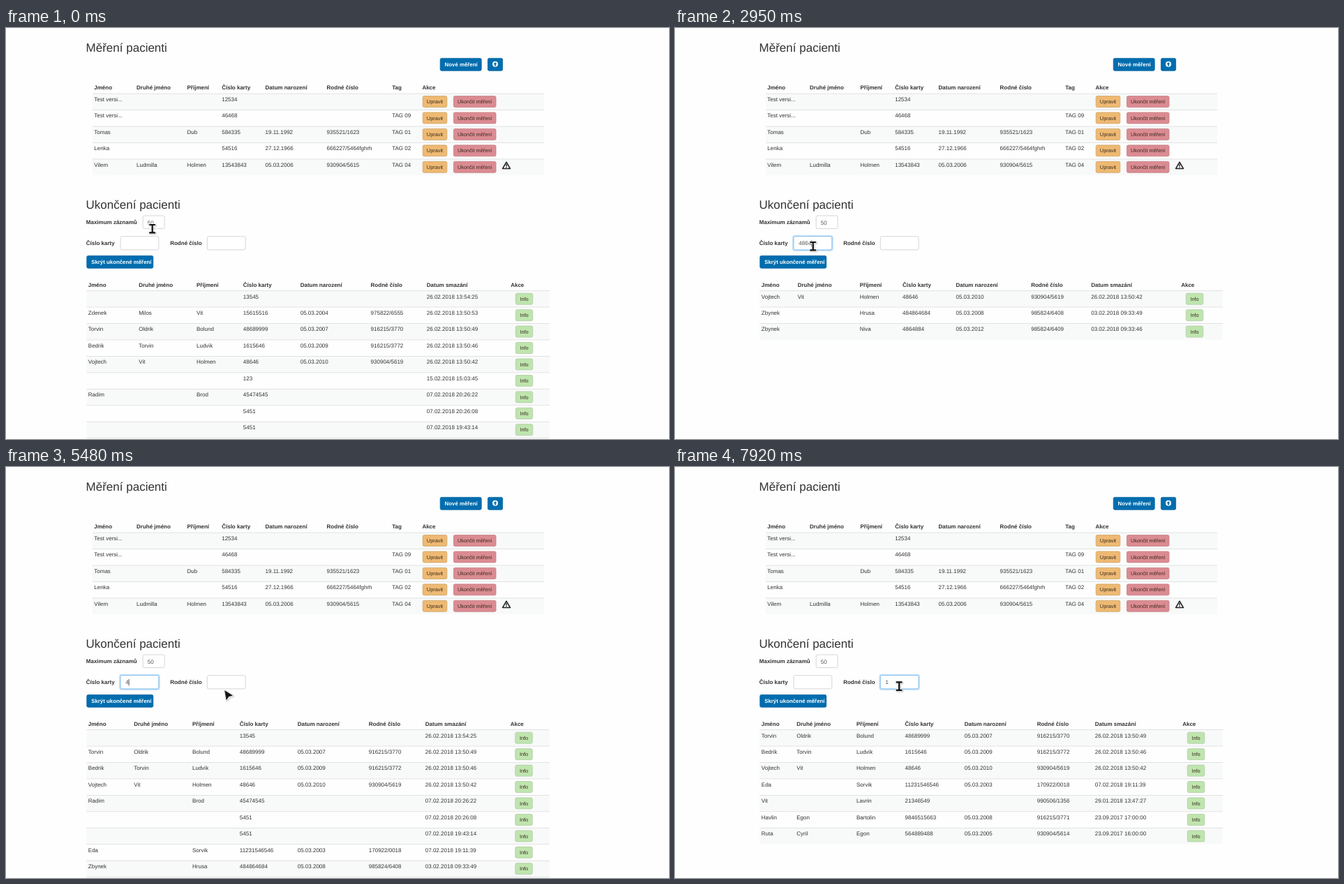
An HTML page for the animation above (8 s loop, 950 by 589 pixels).

```html
<!DOCTYPE html>
<html lang="cs">
<head>
<meta charset="utf-8">
<title>Pacienti</title>
<style>
html, body { margin: 0; width: 100%; height: 100%; overflow: hidden; background: #fefefe; }
svg { display: block; width: 950px; height: 589px; }
text { font: 8px "Liberation Sans", Arial, sans-serif; fill: #333; text-rendering: geometricPrecision; white-space: pre; }
.b { font-weight: bold; }
.h { font-size: 17px; }
.w { font-weight: bold; fill: #fff; font-size: 7.85px; }
.s { font-size: 7.35px; fill: #3a2c20; text-anchor: middle; }
.i { font-size: 8.1px; fill: #555; }
</style>
</head>
<body>
<svg id="stage" viewBox="0 0 950 589" xmlns="http://www.w3.org/2000/svg"></svg>
<script>
const LOOP = 8000, PITCH = 23.45, DIGIT = 4.5;
const stage = document.getElementById('stage');

function el(parent, tag, attrs, content) {
  const n = document.createElementNS('http://www.w3.org/2000/svg', tag);
  for (const k in attrs) n.setAttribute(k, attrs[k]);
  if (content !== undefined) n.textContent = content;
  return parent.appendChild(n);
}
const text = (p, x, y, s, cls = '') => el(p, 'text', { x, y, class: cls }, s);
const rect = (p, x, y, width, height, fill, more) => el(p, 'rect', { x, y, width, height, fill, ...more });
const rule = (p, x, y, w) => rect(p, x, y, w, 0.8, '#dcdcdc');
const box = (p, x, y, w, h, fill, stroke) =>
  rect(p, x + 0.4, y + 0.4, w - 0.8, h - 0.8, fill, { rx: 2, stroke, 'stroke-width': 0.8 });

function smallButton(p, x, cy, w, label, fill, stroke) {
  box(p, x, cy - 8.4, w, 16.8, fill, stroke);
  text(p, x + w / 2, cy + 2.6, label, 's');
}
function blueButton(p, x, y, w, label) {
  box(p, x, y, w, 18.6, '#006dae', '#0064a2');
  if (label) text(p, x + 6.8, y + 11.7, label, 'w');
}

const page = el(stage, 'g', {});

// Measured patients
text(page, 114.6, 34, 'Měření pacienti', 'h');
blueButton(page, 621.8, 43, 59.8, 'Nové měření');
blueButton(page, 690, 43, 22);
el(page, 'circle', { cx: 701, cy: 51.8, r: 4, fill: '#fff' });
el(page, 'path', { d: 'M701 48.9 L703.5 51.7 H701.9 V54.5 H700.1 V51.7 H698.5 Z', fill: '#006dae' });

const topX = [126.3, 187, 259.5, 309.2, 371.6, 459.6, 553.2, 596.4];
const topHead = ['Jméno', 'Druhé jméno', 'Příjmení', 'Číslo karty', 'Datum narození', 'Rodné číslo', 'Tag', 'Akce'];
const topRows = [
  'Test versi...|||12534',
  'Test versi...|||46468|||TAG 09',
  'Tomas||Dub|584335|19.11.1992|935521/1623|TAG 01',
  'Lenka|||54516|27.12.1966|666227/5464fghrh|TAG 02',
  'Vilem|Ludmilla|Holmen|13543843|05.03.2006|930904/5615|TAG 04'
];
topHead.forEach((s, i) => text(page, topX[i], 88, s, 'b'));
topRows.forEach((row, r) => {
  const y = 93.7 + r * PITCH;
  if (r % 2 === 0) rect(page, 124, y, 647, PITCH, '#f8f9f9');
  rule(page, 124, y, 647);
  row.split('|').forEach((s, i) => text(page, topX[i], y + 11.2, s));
  smallButton(page, 596.8, y + 11.8, 35.4, 'Upravit', '#eeb972', '#cfa568');
  smallButton(page, 641, y + 11.8, 61.4, 'Ukončit měření', '#db8b92', '#c67f86');
});
el(page, 'path', {
  d: 'M717 192.2 L722.4 201.5 H711.6 Z', fill: 'none', stroke: '#222',
  'stroke-width': 1.5, 'stroke-linejoin': 'round'
});
rect(page, 716.3, 195, 1.4, 3.4, '#222');
rect(page, 716.3, 199, 1.4, 1.2, '#222');

// Finished patients: form
text(page, 114.6, 259.4, 'Ukončení pacienti', 'h');
text(page, 114.8, 281.4, 'Maximum záznamů', 'b');
box(page, 195.8, 268.6, 31.8, 19.4, '#fff', '#ccc');
text(page, 202.8, 281.6, '50', 'i');
text(page, 114.8, 311.4, 'Číslo karty', 'b');
text(page, 235.2, 311.4, 'Rodné číslo', 'b');

function field(x) {
  const glow = rect(page, x - 0.7, 297.6, 57, 21.4, 'none',
    { rx: 3, stroke: '#66afe9', 'stroke-width': 1.8, opacity: 0.35 });
  const frame = box(page, x, 298.3, 55.6, 20, '#fff', '#ccc');
  const value = text(page, x + 7.6, 311.4, '', 'i');
  const caret = rect(page, 0, 304, 0.8, 9.4, '#333');
  return (s, focus, blink) => {
    glow.style.display = focus ? '' : 'none';
    frame.setAttribute('stroke', focus ? '#66afe9' : '#ccc');
    value.textContent = s;
    caret.style.display = focus && blink ? '' : 'none';
    caret.setAttribute('x', x + 7.6 + s.length * DIGIT);
  };
}
const cardField = field(163.6), birthField = field(287.9);
blueButton(page, 115.4, 326, 95.8, 'Skrýt ukončené měření');

// Finished patients: list
const head = ['Jméno', 'Druhé jméno', 'Příjmení', 'Číslo karty', 'Datum narození', 'Rodné číslo', 'Datum smazání', 'Akce'];
const rows = [
  '|||13545|||26.02.2018 13:54:25',
  'Zdenek|Milos|Vit|15615516|05.03.2004|975822/6555|26.02.2018 13:50:53',
  'Torvin|Oldrik|Bolund|48689999|05.03.2007|916215/3770|26.02.2018 13:50:49',
  'Bedrik|Torvin|Ludvik|1615646|05.03.2009|916215/3772|26.02.2018 13:50:46',
  'Vojtech|Vit|Holmen|48646|05.03.2010|930904/5619|26.02.2018 13:50:42',
  '|||123|||15.02.2018 15:03:45',
  'Radim||Brod|45474545|||07.02.2018 20:26:22',
  '|||5451|||07.02.2018 20:26:08',
  '|||5451|||07.02.2018 19:43:14',
  'Eda||Sorvik|11231546546|05.03.2003|170922/0018|07.02.2018 19:11:39',
  'Zbynek||Hrusa|484864684|05.03.2008|985824/6408|03.02.2018 09:33:49',
  'Zbynek||Niva|4864884|05.03.2012|985824/6409|03.02.2018 09:33:46',
  'Vit||Lavrin|21346549||990506/1356|29.01.2018 13:47:27',
  '|||15487|||24.01.2018 10:12:05',
  'Havlin|Egon|Bartolin|9846515663|05.03.2008|916215/3771|23.09.2017 17:00:00',
  'Ruta|Cyril|Egon|564889488|05.03.2005|930904/5614|23.09.2017 16:00:00'
].map(s => s.split('|'));

const layouts = {
  all: [117.8, 190.2, 273, 339.8, 421.7, 522.6, 602.8, 723.2],
  one: [117.8, 183.2, 267, 334.8, 417.7, 519.8, 600.8, 722.7],
  few: [117.8, 169.7, 258.7, 320, 396.5, 504.2, 590.2, 719.2],
  birth: [117.8, 168.2, 254, 323.6, 408.7, 512.7, 595.7, 721.2],
  none: [117.8, 173.9, 269.8, 335.5, 417.7, 533.6, 623.5, 737.4]
};

const lists = {};
function list(card, birth) {
  const key = card + '/' + birth;
  if (lists[key]) return lists[key];
  const found = rows.filter(r => r[3].includes(card) && (r[5] || '').includes(birth));
  const kind = !found.length ? 'none' : birth ? 'birth' : card.length > 1 ? 'few' : card ? 'one' : 'all';
  const x = layouts[kind], g = el(page, 'g', {});
  head.forEach((s, i) => text(g, x[i], 371, s, 'b'));
  found.slice(0, 10).forEach((row, r) => {
    const y = 376.2 + r * PITCH;
    if (r % 2 === 0) rect(g, 115.4, y, 663.6, PITCH, '#f8f9f9');
    rule(g, 115.4, y, 663.6);
    row.forEach((s, i) => text(g, x[i], y + 11.3, s));
    smallButton(g, x[7] + 6.7, y + 12, 25.2, 'Info', '#bfe5ae', '#b0cba6');
  });
  if (!found.length) rule(g, 115.4, 376.2, 663.6);
  return lists[key] = { g, shift: found.length > 8 ? 0 : 6 };
}

// Pointer
function pointer(d, more) {
  const g = el(stage, 'g', {});
  const base = { d, 'stroke-linejoin': 'round', 'stroke-linecap': 'round' };
  el(g, 'path', { ...base, ...more, stroke: '#999', 'stroke-width': 4.4, opacity: 0.45, transform: 'translate(.8 .9)' });
  el(g, 'path', { ...base, ...more, stroke: '#eee', 'stroke-width': 4.2 });
  el(g, 'path', { ...base, ...more, stroke: '#111', 'stroke-width': more.fill === 'none' ? 2.2 : 0.8 });
  return g;
}
const beam = pointer('M-3.4 -5.6 H3.6 M0.2 -5.6 V5.8 M-3.4 5.8 H3.6', { fill: 'none' });
const arrow = pointer('M1 1 L11.2 7.4 L6.2 8.6 L3 13 Z', { fill: '#111' });

// time, x, y
const path = [
  [0, 209.5, 287.6], [60, 209.5, 287.6], [250, 203, 300], [450, 197.6, 312.6],
  [5230, 197.6, 312.6], [5480, 313, 320], [5560, 318, 321], [5760, 321, 316], [5900, 321, 314], [LOOP, 321, 314]
];
function place(t) {
  const i = path.findIndex(p => p[0] > t), a = path[i - 1], b = path[i];
  const k = (t - a[0]) / (b[0] - a[0]);
  return [a[1] + (b[1] - a[1]) * k, a[2] + (b[2] - a[2]) * k];
}

const typed = [
  [0, ''], [1250, '4'], [1360, '48'], [1600, '486'], [2950, '4864'], [3280, '48646'],
  [4980, '4864'], [5180, '486'], [5280, '48'], [5380, '4'], [5530, ''],
  [6370, '1'], [6670, '12'], [7920, '1']
];
const blinks = [410, 710, 1010, 1950, 2310, 2610, 2950, 3630, 3950, 4280, 4630, 6220, 6370, 7030, 7360, 7680];
const FOCUS_CARD = 410, FOCUS_BIRTH = 5870;

function draw(t) {
  const value = typed.filter(s => s[0] <= t).pop()[1];
  const onBirth = t >= FOCUS_BIRTH, onCard = t >= FOCUS_CARD && !onBirth;
  const blink = blinks.filter(b => b <= t).length % 2 === 1;
  const card = onBirth ? '' : value, birth = onBirth ? value : '';
  cardField(card, onCard, blink);
  birthField(birth, onBirth, blink);

  const shown = list(card, birth);
  for (const k in lists) lists[k].g.style.display = lists[k] === shown ? '' : 'none';
  page.setAttribute('transform', `translate(${shown.shift} 0)`);

  const [x, y] = place(t);
  const overGap = (t > 110 && t < 270) || (t > 5290 && t < 5700);
  beam.style.display = overGap ? 'none' : '';
  arrow.style.display = overGap ? '' : 'none';
  (overGap ? arrow : beam).setAttribute('transform', `translate(${x} ${y})`);
}

typed.forEach(s => draw(s[0]));
draw(0);
const start = performance.now();
function tick() {
  draw((performance.now() - start) % LOOP);
  requestAnimationFrame(tick);
}
requestAnimationFrame(tick);
</script>
</body>
</html>
```
